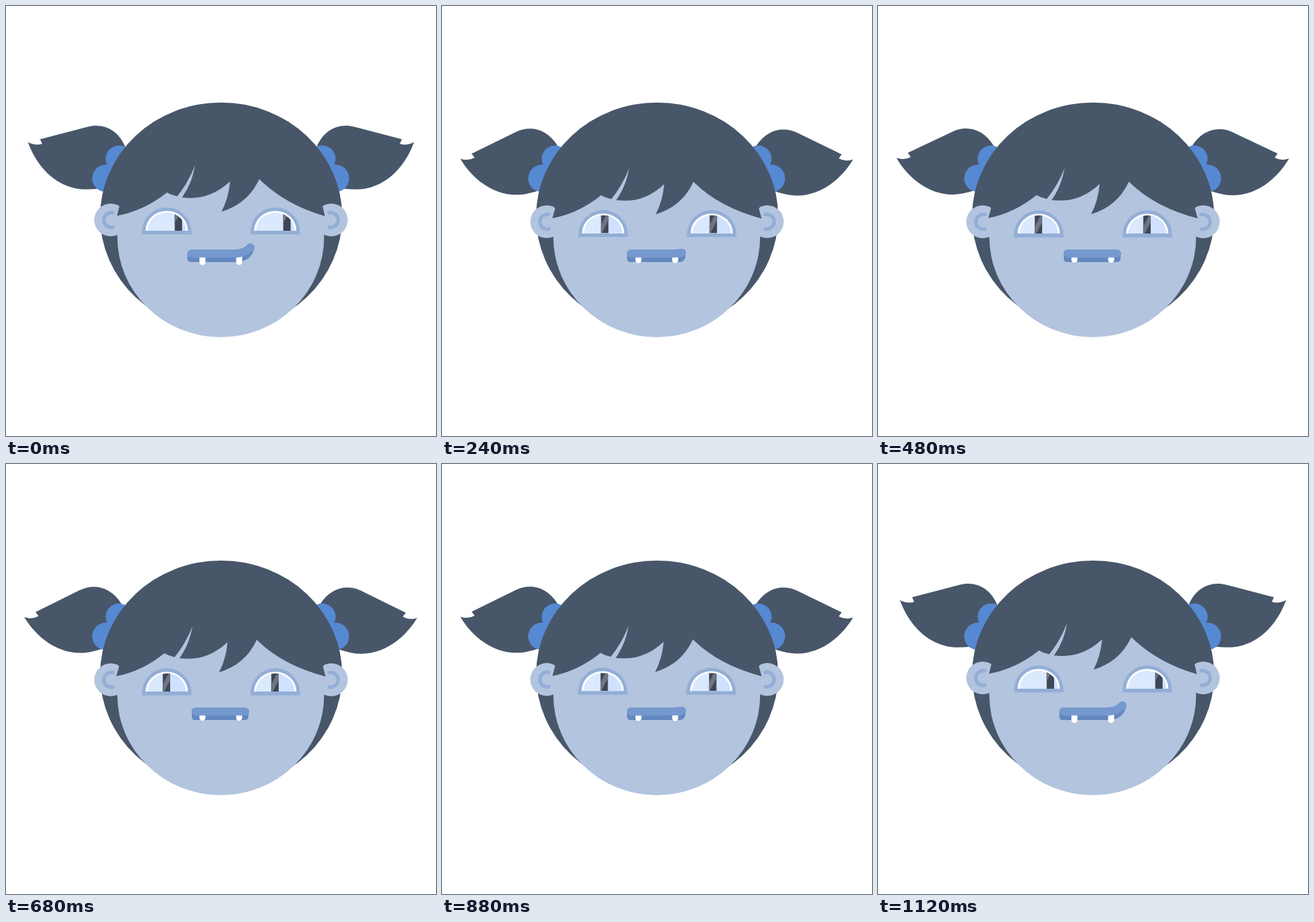
These frames come from a looping animation (618x618 px, 1.6 s). An HTML page:

```html
<!DOCTYPE html>
<html lang="en">
<head>
<meta charset="utf-8">
<title>Girl with pigtails</title>
<style>
  html, body { margin: 0; width: 100%; height: 100%; overflow: hidden; background: #fff; }
  svg { display: block; width: 100vw; height: 100vh; }
  .hair { fill: #485669; }
  .skin { fill: #b2c4de; }
  .band { fill: #5589d2; }
  .rim { fill: #93aed6; }
</style>
</head>
<body>
<svg viewBox="0 0 618 618">
  <defs>
    <path id="tail" class="hair" d="M49 191.5 L117 173.7 C140 167.5 162 178 172 204 L150 259 C140 262 128 263.6 115 263.6 C75 263.6 44.5 232.5 31.5 195.5 Q42 201.5 52 198 Z"/>
    <g id="band" class="band">
      <circle cx="162.5" cy="219.7" r="19.2"/>
      <circle cx="143.5" cy="247.7" r="19.6"/>
    </g>
    <g id="ear">
      <circle class="skin" cx="150.5" cy="307.5" r="23.6"/>
      <path d="M153.5 297.2 A10.6 10.6 0 1 0 153.5 317.9" fill="none" stroke="#93aed6" stroke-width="5" stroke-linecap="round"/>
    </g>
    <clipPath id="ball"><path d="M203.5 323 A27.5 26 0 0 1 258.5 323 Z"/></clipPath>
    <clipPath id="slit"><rect id="slitBox" x="242.5" y="290" width="10.6" height="33"/></clipPath>
    <g id="eye">
      <path class="rim" d="M195.4 328.3 V325 A35.6 35.6 0 0 1 266.6 325 V328.3 Z"/>
      <path fill="#fff" d="M200.6 323 A30.4 28.6 0 0 1 261.4 323 Z"/>
      <g clip-path="url(#ball)">
        <rect x="200" y="290" width="62" height="33" fill="#dae9fe"/>
        <rect id="iris" x="248" y="290" width="60" height="33" fill="#cfe1fe"/>
        <g clip-path="url(#slit)">
          <rect x="200" y="290" width="62" height="33" fill="#3f4656"/>
          <path id="shine" d="M243 297 H250.5 L237 323 H229.5 Z" fill="#6d7584"/>
        </g>
      </g>
    </g>
  </defs>

  <use id="tailL" href="#tail"/>
  <g transform="matrix(-1 0 0 1 618 0)"><use id="tailR" href="#tail"/></g>
  <use href="#band"/>
  <use href="#band" transform="matrix(-1 0 0 1 617 0)"/>
  <ellipse class="hair" cx="309.2" cy="302.6" rx="174" ry="163.9"/>
  <ellipse class="skin" cx="308.6" cy="332.2" rx="148.6" ry="143.7"/>
  <g id="ears">
    <use href="#ear"/>
    <use href="#ear" transform="matrix(-1 0 0 1 618 0)"/>
  </g>
  <path id="fringe" class="hair"/>
  <g id="eyes">
    <use href="#eye"/>
    <use href="#eye" x="156"/>
  </g>
  <path id="lowLip" fill="#6388bf"/>
  <g id="teeth" fill="#fff">
    <path id="tooth" d="M278 355 H286.6 V368 A4.3 4.3 0 0 1 278 368 Z"/>
    <use href="#tooth" x="52.8"/>
  </g>
  <path id="topLip" fill="none" stroke="#7598cf" stroke-width="11.4" stroke-linecap="round"/>
</svg>
<script>
  const LOOP = 1600, STEP = 40;
  const el = id => document.getElementById(id);
  const set = (id, name, value) => el(id).setAttribute(name, value);
  const move = (id, x, y) => set(id, 'transform', `translate(${x} ${y})`);

  // Eased value through [time, value] stops.
  function track(stops, t) {
    const last = stops[stops.length - 1];
    if (t >= last[0]) return last[1];
    const i = stops.findIndex(s => s[0] > t);
    const [t0, a] = stops[i - 1], [t1, b] = stops[i];
    const u = (t - t0) / (t1 - t0);
    return a + (b - a) * u * u * (3 - 2 * u);
  }

  // Out to a peak, settle, then the same way back.
  const swing = (peak, rest) => [[0, 0], [320, peak], [560, rest], [800, peak], [1120, 0]];
  const bump = (t, from) => t > from && t < from + 320 ? Math.sin((t - from) / 320 * Math.PI) : 0;

  const gaze = swing(1, 1), tuft = swing(1, 0.85), flap = swing(13.4, 9.8);

  function drawFringe(p, sx, sy) {
    const dx = -3.9 * p + sx, dy = 4.2 * p + sy;
    const at = (x, y) => `${x + dx} ${y + dy} `;
    const ends = (x, y, side) => `${x + side * p} ${y + 3.7 * p + sy} `;
    set('fringe', 'd',
      'M142 262 L' + ends(163, 287.5, -0.5) + 'L' + ends(159.5, 301.5, -1) +
      'Q' + at(199, 294) + at(231.3, 268) +
      'Q' + at(238, 272) + at(246, 273.5) +
      'Q' + at(262, 254) + at(271.7, 229) +
      'Q' + at(267, 256) + at(253, 275) +
      'Q' + at(292, 280.5) + at(322, 252) +
      'Q' + at(320, 276) + at(309.8, 295.5) +
      'Q' + at(348, 284) + at(364, 248.7) +
      'Q' + at(401, 285.5) + ends(458.3, 302, 1.2) +
      'L' + ends(455, 287.5, 0.5) + 'L476 262 A174 163.9 0 0 0 142 262 Z');
  }

  function drawMouth(p) {
    const m = (a, b) => a + (b - a) * p;
    const left = m(260.6, 267);
    set('topLip', 'd',
      `M${m(266.3, 272.3)} 355.8 H${m(329, 333)} ` +
      `C${m(340, 337)} 355.8 ${m(345, 340)} ${m(352, 355.8)} ${m(351.6, 343.8)} ${m(346.8, 355.8)}`);
    set('lowLip', 'd',
      `M${left} 356 V363 Q${left} 368 ${left + 5} 368 H${m(331, 343)} ` +
      `C${m(346, 346)} 368 ${m(354, 348.6)} ${m(360, 366)} ${m(357, 348.6)} ${m(348, 362)} ` +
      `V${m(348, 356)} Z`);
    move('teeth', 0, -3.3 * p);
  }

  function draw(t) {
    const p = track(gaze, t), angle = -track(flap, t);
    const out = bump(t, 0), back = bump(t, 800);
    const sx = 0.9 * out - 0.2 * back, sy = 0.5 * out - 0.2 * back;
    set('tailL', 'transform', `rotate(${angle} 150 234)`);
    set('tailR', 'transform', `rotate(${angle} 156 230)`);
    move('ears', 0, 2.6 * p + 0.4 * out);
    move('eyes', sx, 4.1 * p + sy);
    set('slitBox', 'x', 242.5 - 17.2 * p);
    move('iris', -17.2 * p, 0);
    move('shine', -9.5 * p, 0);
    drawFringe(track(tuft, t), sx, sy);
    drawMouth(p);
  }

  function tick() {
    const t = performance.now() % LOOP;
    draw(Math.floor(t / STEP) * STEP);
    requestAnimationFrame(tick);
  }
  tick();
</script>
</body>
</html>
```
